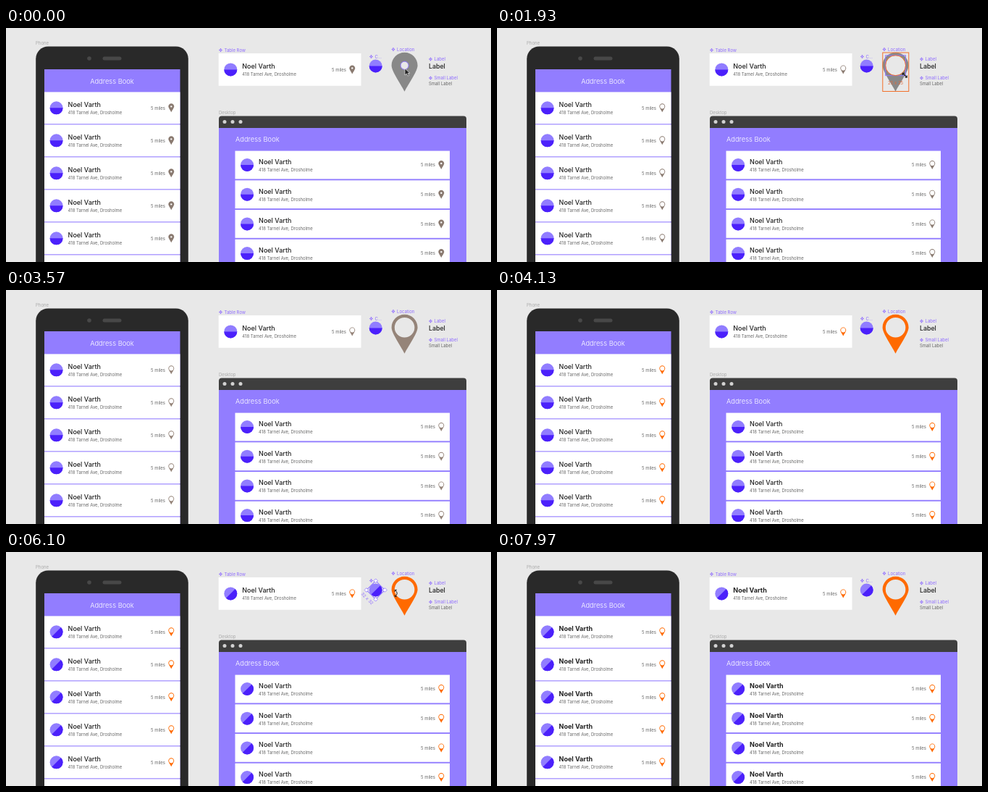
Animation of 670 by 323 pixels, one loop 8 s. Source, as an HTML page:

```html
<!DOCTYPE html>
<html lang="en">
<head>
<meta charset="utf-8">
<title>Components</title>
<style>
  html, body { margin: 0; width: 100%; height: 100%; overflow: hidden; background: #e8e8e8; }
  svg { display: block; width: 670px; height: 323px; font-family: Inter, "Open Sans", sans-serif; }
  .name { font-size: 9px; font-weight: 500; fill: #222; }
  .note { font-size: 5.95px; fill: #666; }
  .tag { font-size: 6px; fill: #8f6cff; }
  .frame { font-size: 6px; fill: #aaa; }
  .title { font-size: 9.4px; font-weight: 300; fill: #fff; }
  .line { fill: none; stroke: #9077ff; stroke-width: 1; }
  .handle { fill: #fff; stroke: #9077ff; stroke-width: .8; }
  .guide { fill: none; stroke: #f2702a; stroke-width: 1; }
</style>
</head>
<body>
<svg id="stage" viewBox="0 0 670 323">
  <defs>
    <path id="pin" fill-rule="evenodd"/>
    <g id="avatar">
      <circle r="9" fill="#917dff"/>
      <path d="M-9 0A9 9 0 0 0 9 0Z" fill="#4b20fb"/>
    </g>
    <path id="mark" d="M0-2.5l1.1 1.1L0-.3-1.1-1.4ZM0 .3l1.1 1.1L0 2.5-1.1 1.4ZM-1.4-1.1L-.3 0-1.4 1.1-2.5 0ZM1.4-1.1L2.5 0 1.4 1.1.3 0Z" fill="#8f6cff"/>
  </defs>
  <g id="scene"></g>
  <g id="overlay"></g>
  <g id="cursor"></g>
</svg>
<script>
const $ = id => document.getElementById(id);
const LOOP = 8000;
const PURPLE = '#927dff';
const PERSON = 'Noel Varth';
const ADDRESS = '418 Tarnel Ave, Drosholme';

const rect = (x, y, w, h, fill, r = 0) =>
  `<rect x="${x}" y="${y}" width="${w}" height="${h}" rx="${r}" fill="${fill}"/>`;
const dot = (x, y, r, fill) => `<circle cx="${x}" cy="${y}" r="${r}" fill="${fill}"/>`;
const text = (x, y, kind, value, extra = '') =>
  `<text x="${x}" y="${y}" class="${kind}" ${extra}>${value}</text>`;
const tag = (x, y, value, id = '') =>
  `<use href="#mark" x="${x}" y="${y}"/>` + text(x + 5, y + 2.1, 'tag', value, `id="${id}"`);

function row(x, y, w, h, milesX) {
  const mid = y + h / 2, left = x + 16.6;
  return rect(x, y, w, h, '#fff') +
    `<use href="#avatar" x="${left}" y="${mid}"/>` +
    text(left + 16, mid - 1.1, 'name', PERSON) +
    text(left + 16, mid + 8.8, 'note', ADDRESS) +
    text(milesX, mid + 2.2, 'note', '5 miles') +
    `<use href="#pin" class="small" transform="translate(${milesX + 28.3} ${mid - 2}) scale(.222)"/>`;
}

function buildScene() {
  let out = text(41, 23, 'frame', 'Phone') + rect(41.2, 25.4, 210.6, 340, '#292929', 17) +
    dot(115, 42, 2.8, '#484848') + rect(133.5, 39.5, 26, 5, '#484848', 2.5) +
    rect(53, 57, 187.5, 270, PURPLE) +
    text(146.5, 76.8, 'title', 'Address Book', 'text-anchor="middle"');
  for (let i = 0; i < 6; i++) out += row(53, 88.4 + 45 * i, 187.5, 43.9, 200);

  out += text(294, 119, 'frame', 'Desktop') + rect(294, 121.4, 342, 30, '#3e3e3e', 4) +
    rect(294, 138, 342, 190, PURPLE) + text(317, 157.3, 'title', 'Address Book');
  for (let i = 0; i < 3; i++) out += dot(302 + 11 * i, 129.5, 2.5, '#d2d2d2');
  for (let i = 0; i < 4; i++) out += row(316.5, 169.6 + 40.7 * i, 296.5, 38.8, 573);

  return out + tag(296.5, 30.5, 'Table Row') + row(293.7, 35, 196.8, 44.8, 450) +
    tag(504.5, 39.5, 'C...', 'shortTag') + '<use href="#avatar" x="510.7" y="52.5"/>' +
    tag(535, 29.5, 'Location') +
    '<use href="#pin" id="bigPin" transform="translate(550.6 51.7)"/>' +
    tag(586.5, 43, 'Label') + text(584, 56, 'name', 'Label', 'style="font-size:8.8px"') +
    tag(586.5, 69, 'Small Label') + text(584, 79, 'note', 'Small Label');
}

// Piecewise eased motion through [time, ...values] keys.
function along(keys, t) {
  let i = 0;
  while (i < keys.length - 1 && t >= keys[i + 1][0]) i++;
  const a = keys[i], b = keys[i + 1] || a;
  const p = b === a ? 0 : Math.max(0, (t - a[0]) / (b[0] - a[0]));
  const e = p * p * (3 - 2 * p);
  return a.slice(1).map((v, k) => v + (b[k + 1] - v) * e);
}

const holeKeys = [[900, 5.5], [1230, 13.6], [1370, 13.6], [1700, 14.8], [2000, 13.8]];
const fillKeys = [[3500, 136, 136, 136], [3750, 200, 116, 60], [4050, 255, 106, 0]];
const turnKeys = [[5400, 0], [5570, -4], [6050, -45]];
const paths = [
  [[0, 551, 56], [100, 551, 56], [470, 561, 70], [630, 561, 70], [730, 556, 58], [900, 556, 58],
    [1230, 563, 65], [1370, 563, 65], [1700, 565, 67], [2000, 563, 65], [2370, 563, 65], [2570, 600, 325]],
  [[2830, 652, 178], [3130, 672, 120]],
  [[4500, 634, 4], [4730, 516, 46], [5070, 516, 46], [5250, 509.5, 39], [5320, 509.5, 39], [5430, 522, 41],
    [5570, 522, 41], [6050, 539, 57], [6500, 539, 57], [6830, 365, 53], [7200, 365, 53]]
];

const during = (t, from, to) => t >= from && t < to;

function box(x, y, w, h, label = '', handles = true, turn = 0, labelTurn = 0) {
  const cx = x + w / 2, cy = y + h / 2;
  let out = `<g transform="rotate(${turn} ${cx} ${cy})"><rect x="${x}" y="${y}" width="${w}" height="${h}" class="line"/>`;
  if (handles) for (const px of [x, x + w]) for (const py of [y, y + h])
    out += `<rect x="${px - 2}" y="${py - 2}" width="4" height="4" class="handle"/>`;
  return out + '</g>' + text(cx, y + h + 9.6, 'tag', label,
    `text-anchor="middle" transform="rotate(${labelTurn} ${cx} ${cy})"`);
}

const pinBox = (label, handles) => box(532.6, 33.7, 36, 54, label, handles);

function overlay(t, hole, turn) {
  const x = 550.6, y = 51.7;
  let out = '';
  if (t < 300) out += `<circle cx="${x}" cy="${y}" r="${hole}" class="line" stroke-width="1.5"/>`;
  if (during(t, 60, 300)) out += pinBox('', false);
  if (during(t, 300, 2370)) out += box(x - hole, y - hole, hole * 2, hole * 2, '', !during(t, 900, 2000));
  if (during(t, 930, 2000)) {
    const size = Math.round(hole * 3.6 / 2);
    out += '<rect x="532.8" y="34" width="36" height="53.5" class="guide"/>' +
      `<circle cx="${x}" cy="${y}" r="${hole}" class="guide"/>` +
      text(x, 77.5, 'tag', `${size} x ${size}`, 'text-anchor="middle" style="fill:#e0693c"');
    if (during(t, 1150, 1400))
      out += '<path d="M326 65H563M465 63.5l3 3m0-3l-3 3" class="guide" style="stroke:#a85b4a;stroke-width:.7"/>';
  }
  if (during(t, 2430, 2570)) out += box(294, 121, 342, 220, '', false);
  if (during(t, 2770, 3500) || during(t, 4500, 5400)) out += pinBox('65 x 97', true);
  if (during(t, 5070, 5400)) out += box(501.9, 43.7, 17.6, 17.6, '', false);
  if (during(t, 5400, 6500))
    out += box(501.7, 43.5, 18, 18, '32 x 32', true, turn, turn < -22 ? turn + 90 : turn);
  if (during(t, 6500, 6600)) out += pinBox('', false);
  if (during(t, 6660, 7870)) out += box(293.7, 35, 196.8, 44.8, '', false);
  if (during(t, 7170, 7870)) out += box(326.5, 47.5, 94, 11, '', true);
  return out;
}

function cursor(t) {
  const path = paths.find(p => during(t, p[0][0], p[p.length - 1][0]));
  if (!path) return '';
  const [x, y] = along(path, t);
  let shape = '<path d="M0 0V9L2.4 7 4 10.2 5.6 9.4 4.1 6.3H7Z" fill="#222" stroke="#fff" stroke-width=".6"/>';
  if (during(t, 730, 2100))
    shape = '<path d="M-3-3L3 3M-3-.3V-3H-.3M3 .3V3H.3" fill="none" stroke="#222" stroke-width="1.2"/>';
  if (during(t, 5430, 6500))
    shape = '<path d="M-1.5-4.5Q4 0-1.5 4.5M-1.8-2V-4.6H.8M-1.8 2V4.6H.8" fill="none" stroke="#222" stroke-width="1"/>';
  return `<g transform="translate(${x} ${y})">${shape}</g>`;
}

$('scene').innerHTML = buildScene();
const names = [...document.querySelectorAll('.name')].filter(n => n.textContent === PERSON);
const smallPins = document.querySelectorAll('.small');

function draw(t) {
  const [hole] = along(holeKeys, t);
  const [turn] = along(turnKeys, t);
  const color = `rgb(${along(fillKeys, t).map(Math.round)})`;
  $('pin').setAttribute('d', 'M0-18C-10-18-18-10-18 0C-18 8-6 24 0 36C6 24 18 8 18 0C18-10 10-18 0-18Z' +
    `M${-hole} 0a${hole} ${hole} 0 1 0 ${2 * hole} 0a${hole} ${hole} 0 1 0 ${-2 * hole} 0Z`);
  $('bigPin').setAttribute('fill', color);
  smallPins.forEach(p => p.setAttribute('fill', t < 3500 ? '#8a7a70' : color));
  $('avatar').setAttribute('transform', `rotate(${turn})`);
  $('shortTag').setAttribute('visibility', during(t, 5400, 6500) ? 'hidden' : 'visible');
  names.forEach(n => n.style.fontWeight = t < 7900 ? 500 : 700);
  $('overlay').innerHTML = overlay(t, hole, turn);
  $('cursor').innerHTML = cursor(t);
}

const start = performance.now();
function tick() {
  draw((performance.now() - start) % LOOP);
  requestAnimationFrame(tick);
}
tick();
</script>
</body>
</html>
```
